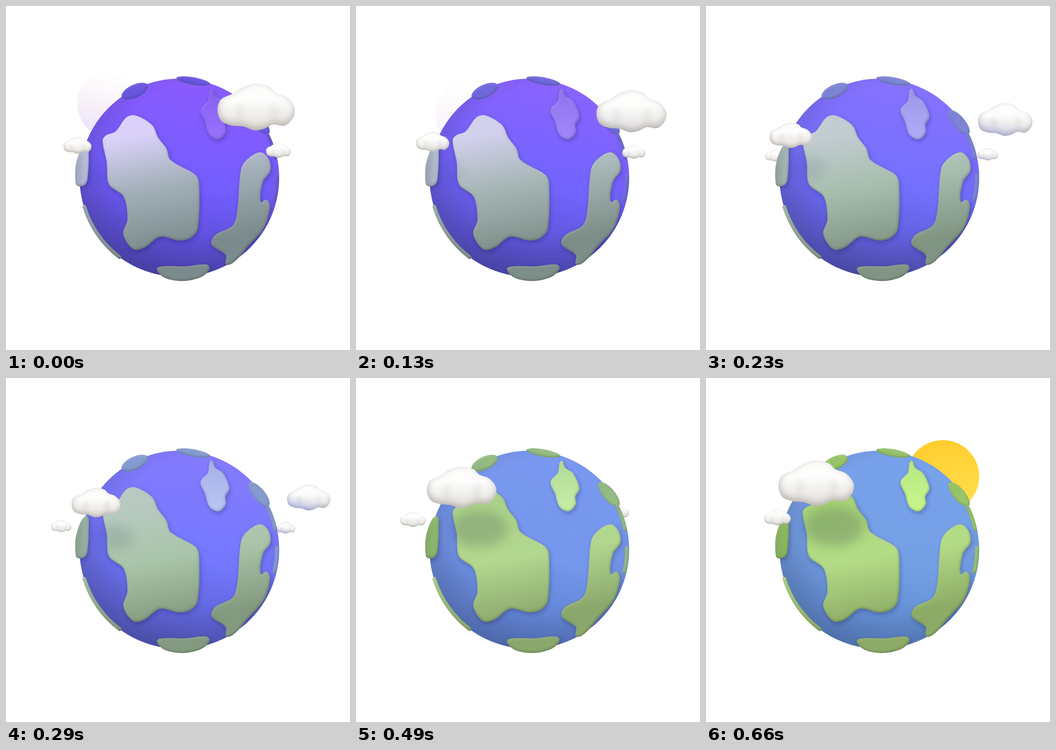
These frames come from a looping animation (748x748 px, 690 ms). An HTML page:

```html
<!DOCTYPE html>
<html lang="en">
<head>
<meta charset="utf-8">
<title>Day and night globe</title>
<style>
html, body { margin: 0; width: 100%; height: 100%; overflow: hidden; background: #fff; }
svg { display: block; width: 100vw; height: 100vh; }
</style>
</head>
<body>
<svg viewBox="0 0 748 748" xmlns="http://www.w3.org/2000/svg">
  <defs>
    <linearGradient id="ocean" gradientUnits="userSpaceOnUse" x1="425" y1="160" x2="345" y2="592"></linearGradient>
    <linearGradient id="land" gradientUnits="userSpaceOnUse" x1="245" y1="240" x2="300" y2="540"></linearGradient>
    <linearGradient id="north" gradientUnits="userSpaceOnUse" x1="0" y1="180" x2="0" y2="290"></linearGradient>
    <linearGradient id="rim"></linearGradient>
    <linearGradient id="west"></linearGradient>
    <linearGradient id="sunFill" x1=".4" y1="0" x2=".6" y2="1">
      <stop offset="0" stop-color="#ffcd30"/><stop offset="1" stop-color="#ffe04c"/>
    </linearGradient>
    <linearGradient id="moonFill" x1=".45" y1="0" x2=".2" y2="1">
      <stop offset=".05" stop-color="#fff"/><stop offset=".4" stop-color="#fbf5fa"/><stop offset="1" stop-color="#e9def8"/>
    </linearGradient>
    <radialGradient id="limb" gradientUnits="userSpaceOnUse" cx="405" cy="335" r="260">
      <stop offset=".62" stop-color="#223" stop-opacity="0"/><stop offset="1" stop-color="#223" stop-opacity=".22"/>
    </radialGradient>
    <linearGradient id="puffFill" x1=".45" y1="0" x2=".5" y2="1">
      <stop offset=".35" stop-color="#fdfdfc"/><stop offset="1" stop-color="#e2dfdb"/>
    </linearGradient>
    <radialGradient id="crease">
      <stop offset="0" stop-color="#8a8480" stop-opacity=".1"/><stop offset="1" stop-color="#8a8480" stop-opacity="0"/>
    </radialGradient>
    <linearGradient id="tintFill" x1=".25" y1="1" x2=".5" y2=".3">
      <stop offset="0" stop-color="#7f8df5"/><stop offset=".75" stop-color="#a9b4ff" stop-opacity="0"/>
    </linearGradient>
    <filter id="bevel" filterUnits="userSpaceOnUse" x="130" y="130" width="490" height="490" color-interpolation-filters="sRGB">
      <feGaussianBlur in="SourceAlpha" stdDeviation="2.4" result="b"/>
      <feOffset in="b" dx="1" dy="2" result="down"/>
      <feFlood flood-color="#fff" flood-opacity=".18"/>
      <feComposite in2="down" operator="out"/>
      <feComposite in2="SourceAlpha" operator="in" result="lit"/>
      <feOffset in="b" dx="-1" dy="-2" result="up"/>
      <feFlood flood-color="#1c2a20" flood-opacity=".32"/>
      <feComposite in2="up" operator="out"/>
      <feComposite in2="SourceAlpha" operator="in" result="dark"/>
      <feMerge><feMergeNode in="SourceGraphic"/><feMergeNode in="lit"/><feMergeNode in="dark"/></feMerge>
    </filter>
    <filter id="puff" x="-10%" y="-10%" width="120%" height="120%" color-interpolation-filters="sRGB">
      <feGaussianBlur in="SourceAlpha" stdDeviation="8" result="b"/>
      <feOffset in="b" dx="1" dy="-5" result="up"/>
      <feFlood flood-color="#88847a" flood-opacity=".55"/>
      <feComposite in2="up" operator="out"/>
      <feComposite in2="SourceAlpha" operator="in" result="dark"/>
      <feMerge><feMergeNode in="SourceGraphic"/><feMergeNode in="dark"/></feMerge>
    </filter>
    <filter id="soft" x="-20%" y="-20%" width="140%" height="140%"><feGaussianBlur stdDeviation="5"/></filter>
    <filter id="softer" x="-60%" y="-60%" width="220%" height="220%"><feGaussianBlur stdDeviation="11"/></filter>
    <clipPath id="globe"><ellipse cx="377" cy="373.5" rx="217" ry="215.5"/></clipPath>
  </defs>
  <circle id="sun" r="79" fill="url(#sunFill)"/>
  <circle id="moon" r="78" fill="url(#moonFill)"/>
  <g id="back"></g>
  <ellipse cx="377" cy="373.5" rx="217" ry="215.5" fill="url(#ocean)"/>
  <ellipse cx="377" cy="373.5" rx="217" ry="215.5" fill="url(#limb)"/>
  <g clip-path="url(#globe)"><path id="cast" transform="translate(2 4)" fill="#15154f" opacity=".3" filter="url(#soft)"/></g>
  <g id="lands" filter="url(#bevel)"></g>
  <g clip-path="url(#globe)"><ellipse id="shade" fill="#1c2a44" filter="url(#softer)"/></g>
  <g id="front"></g>
</svg>
<script>
const NS = 'http://www.w3.org/2000/svg';
const $ = id => document.getElementById(id);
const LOOP = 690, TURN = 630, FRAME = 33.3;

function set(el, attrs) {
  for (const k in attrs) el.setAttribute(k, attrs[k]);
}

function add(parent, tag, attrs = {}) {
  const el = document.createElementNS(NS, tag);
  set(el, attrs);
  return parent.appendChild(el);
}

// Closed smooth curve; handles scale with the length of each side
function blob(text) {
  const pts = text.split(' ').map(s => s.split(',').map(Number));
  const n = pts.length;
  const node = i => pts[(i + n) % n];
  const handle = (i, len) => {
    const [p, a, b] = [node(i), node(i - 1), node(i + 1)];
    const k = len / Math.hypot(b[0] - a[0], b[1] - a[1]);
    return [p[0] + (b[0] - a[0]) * k, p[1] + (b[1] - a[1]) * k];
  };
  let d = 'M' + pts[0];
  for (let i = 0; i < n; i++) {
    const p = node(i), q = node(i + 1);
    const len = .31 * Math.hypot(q[0] - p[0], q[1] - p[1]);
    d += `C${handle(i, len)} ${handle(i + 1, -len)} ${q}`;
  }
  return d + 'Z';
}

// Raised land
const pads = [
  ['land', '210,292 218,281 238,273 262,242 282,238 318,259 331,286 349,310 358,335 412,367 420,386 417,485 402,504 376,510 335,502 302,525 277,529 255,496 264,465 256,415 224,388 219,340'],
  ['land', '511,355 525,333 553,318 571,332 575,358 559,382 554,426 567,421 574,438 560,484 525,524 498,555 479,562 478,542 447,518 455,498 493,477 503,445'],
  ['land', '328,572 342,566 390,566 435,562 443,571 425,589 385,598 345,591'],
  ['west', '151,380 152,345 165,308 177,301 180,320 177,378 170,390 155,391'],
  ['north', '446,180 456,196 472,207 486,240 477,258 478,275 463,290 443,281 433,252 423,226 439,206']
];
for (const [fill, pts] of pads) {
  const d = blob(pts);
  add($('lands'), 'path', { d, fill: `url(#${fill})` });
  $('cast').setAttribute('d', ($('cast').getAttribute('d') || '') + d);
}

// Land seen edge-on: ovals near the top, thin arcs along the outline
function oval(cx, cy, rx, ry, turn) {
  add($('lands'), 'ellipse', { cx, cy, rx, ry, transform: `rotate(${turn} ${cx} ${cy})`, fill: 'url(#rim)' });
}
function arc(color, r, from, to) {
  const p = deg => [377 + r * Math.cos(deg * Math.PI / 180), 373.5 + r * Math.sin(deg * Math.PI / 180)];
  add($('lands'), 'path', {
    d: `M${p(from)}A${r} ${r} 0 0 1 ${p(to)}`,
    fill: 'none', stroke: `url(#${color})`, 'stroke-width': 8, 'stroke-linecap': 'round'
  });
}
arc('rim', 213, -25, -12);
arc('rim', 212, -1, 13);
arc('land', 216, 127, 163);
oval(280, 185, 31, 14, -25);
oval(407, 163, 37, 8, 10);
oval(550, 253, 33, 13, 50);

// Gradient stops: offset, night, dusk, day
const palette = {
  ocean: [[0, '#8c5bff', '#847fff', '#77a1eb'], [.52, '#735dff', '#747cff', '#75a0e6'], [1, '#5046c0', '#545cc4', '#5b86cc']],
  land: [[.15, '#dbd2fb', '#b2c8b8', '#a9d477'], [.55, '#a2afb8', '#abc8a8', '#b4dc86'], [1, '#7b8a8c', '#859c7e', '#8cab66']],
  north: [[0, '#855ef0', '#acbbe4', '#b6e680'], [1, '#9a72ff', '#bcd2f4', '#c8f88c']],
  rim: [[0, '#6653de', '#859fcc', '#93c068'], [1, '#6a58e2', '#8ca8d0', '#9bc76a']],
  west: [[0, '#9aa0b4', '#849c84', '#82ac5a'], [1, '#c6c8ea', '#98b4a4', '#8ebe62']]
};
const rgb = hex => [1, 3, 5].map(i => parseInt(hex.slice(i, i + 2), 16));
const mix = (a, b, u) => `rgb(${a.map((v, i) => Math.round(v + (b[i] - v) * u))})`;
const stops = Object.entries(palette).flatMap(([id, rows]) => rows.map(([offset, ...colors]) => {
  const [night, dusk, day] = colors.map(rgb);
  return { el: add($(id), 'stop', { offset }), night, dusk, day };
}));

const puffPath = blob('-81,6 -74,-16 -50,-28 -26,-43 2,-50 30,-43 42,-31 65,-22 82,-1 80,21 62,39 37,37 17,46 -3,49 -26,41 -50,39 -73,29');

// Each cloud drifts along a Bezier curve of x, y and width
function makeCloud(x, y, w, isFront, tinted) {
  const g = add($('front'), 'g');
  const body = add(g, 'g', { filter: 'url(#puff)' });
  add(body, 'path', { d: puffPath, fill: 'url(#puffFill)' });
  for (const cx of [-34, 38]) add(body, 'ellipse', { cx, cy: 10, rx: 17, ry: 27, fill: 'url(#crease)' });
  const tint = add(g, 'path', { d: puffPath, fill: 'url(#tintFill)' });
  return { g, tint, x, y, w, isFront, tinted };
}
const bezier = ([a, b, c, d], u) => {
  const v = 1 - u;
  return a * v * v * v + 3 * b * v * v * u + 3 * c * v * u * u + d * u * u * u;
};
const left = makeCloud([155, 190, 212, 238.5], [303, 280, 253, 229], [61, 95, 130, 164], () => true, false);
const clouds = [
  makeCloud([592, 634, 617, 480], [314, 324, 331, 340], [54, 42, 36, 30], u => u < .2, true),
  makeCloud([543, 740, 650, 522], [220, 246, 290, 295], [168, 125, 25, 55], u => u < .4, true),
  left,
  makeCloud([262, 105, 53, 155], [332, 327, 315, 303], [34, 42, 50, 58], u => u > .6, false)
];

function draw(t) {
  const p = Math.min(1, t / TURN);
  const u = p * p * (3 - 2 * p);

  for (const s of stops) {
    s.el.setAttribute('stop-color', u < .5 ? mix(s.night, s.dusk, u * 2) : mix(s.dusk, s.day, u * 2 - 1));
  }
  set($('moon'), { cx: 233 + 167 * u, cy: 212 + 210 * u, opacity: Math.max(0, 1 - 4.5 * u) });
  set($('sun'), { cx: 515 - 487 * (1 - u), cy: 214 + 670 * (1 - u), visibility: u > .8 ? 'visible' : 'hidden' });

  for (const c of clouds) {
    const [x, y, w] = [c.x, c.y, c.w].map(k => bezier(k, u));
    c.g.setAttribute('transform', `translate(${x} ${y}) scale(${w / 164})`);
    c.tint.setAttribute('opacity', c.tinted ? .5 * Math.sin(Math.PI * u) ** 2 : 0);
    $(c.isFront(u) ? 'front' : 'back').appendChild(c.g);
    if (c === left) {
      set($('shade'), { cx: x + 40, cy: y + 43 + .31 * w, rx: .4 * w, ry: .26 * w, opacity: .04 + .16 * u });
    }
  }
}

// The picture advances about 30 times a second, on 10 ms marks
const mark = k => Math.floor(k * FRAME / 10) * 10;
let shown = -1;
const start = performance.now();
function tick() {
  const t = (performance.now() - start) % LOOP;
  let k = Math.floor(t / FRAME);
  if (mark(k + 1) <= t) k++;
  const now = Math.min(mark(k), 660);
  if (now !== shown) draw(shown = now);
  requestAnimationFrame(tick);
}
tick();
</script>
</body>
</html>
```
